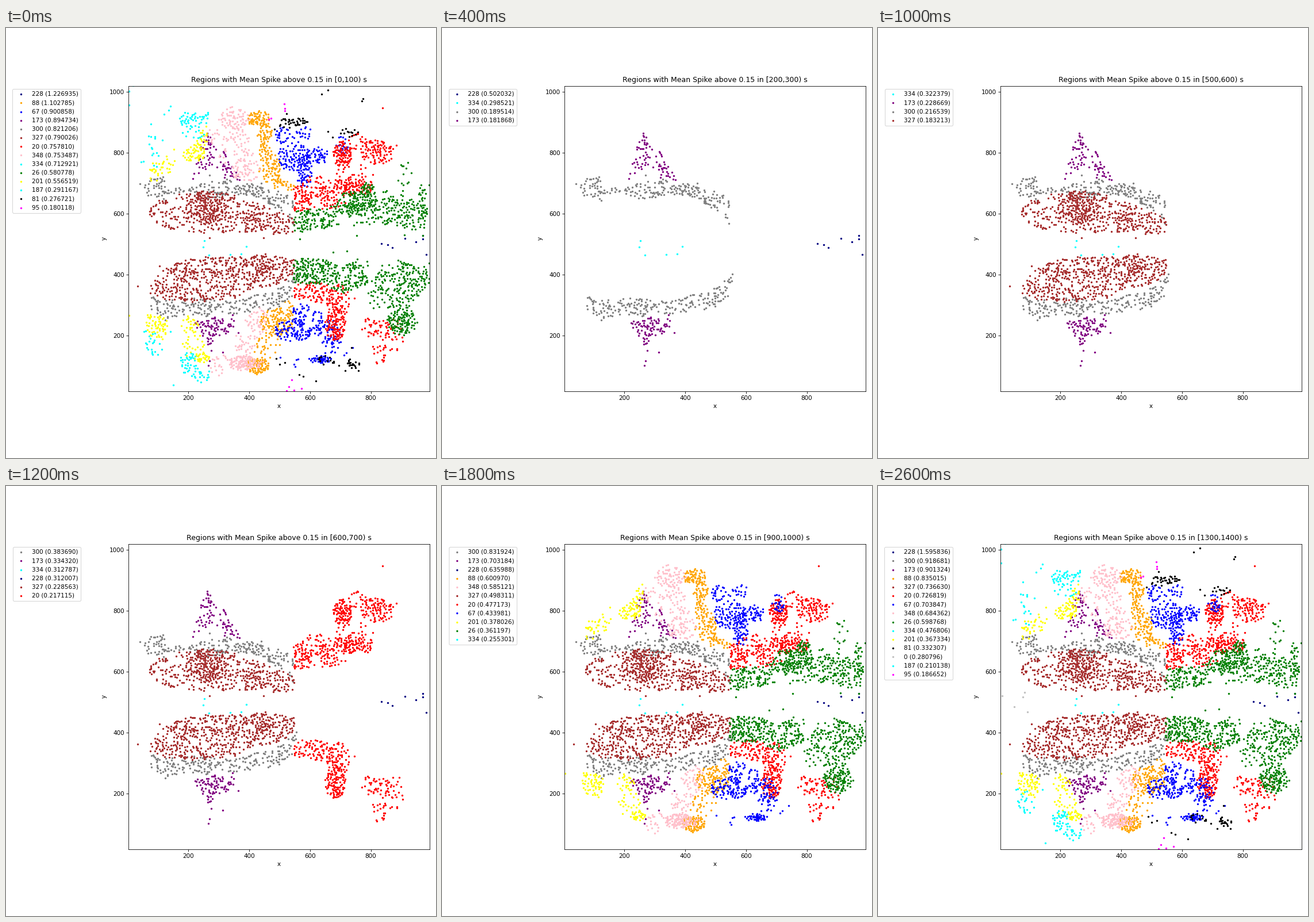
A matplotlib script that plays this animation: 748 px wide and 748 px high, repeating every 2.8 s.

```python
import numpy as np
import matplotlib.pyplot as plt
from matplotlib.animation import FuncAnimation

SIZE, DPI = 748, 74.8
THRESHOLD = 0.15
BASELINE = 0.153462
GAP = 3.6  # smallest distance between cells of one region

regions = {}


def band(n, *spans):
    """n cells between lower and upper outlines given as (x, low, high)."""
    x, low, high = np.array(spans, float).T

    def draw(rng):
        while True:
            px, py = rng.uniform(x[0], x[-1]), rng.uniform(low.min(), high.max())
            if np.interp(px, x, low) <= py <= np.interp(px, x, high):
                return px, py
    return n, draw


def blob(n, cx, cy, rx, ry):
    """n cells inside an ellipse, a little denser towards its centre."""
    def draw(rng):
        r, a = rng.uniform() ** 0.6, rng.uniform(0, 2 * np.pi)
        return cx + rx * r * np.cos(a), cy + ry * r * np.sin(a)
    return n, draw


def region(key, color, *parts, dots=()):
    rng = np.random.default_rng(key + 11)
    cells = np.empty((0, 2))
    for n, draw in parts:
        for _ in range(n):
            for _ in range(12):
                p = np.array(draw(rng))
                if not len(cells) or np.hypot(*(cells - p).T).min() > GAP:
                    break
            cells = np.vstack([cells, p])
    if dots:
        cells = np.vstack([cells, dots])
    regions[key] = color, cells


region(228, "navy", dots=[(835, 502), (855, 498), (871, 489), (912, 518),
                          (949, 507), (970, 517), (971, 527), (983, 466)])
region(334, "cyan", dots=[(253, 510), (250, 490), (268, 464),
                          (338, 466), (374, 468), (391, 492)])
region(95, "magenta", dots=[(516, 960), (517, 945), (517, 938), (472, 914),
                            (464, 909), (541, 53), (530, 30), (548, 20),
                            (573, 25), (524, 17)])
region(53, "gold", dots=[(338, 1010), (386, 957), (516, 996), (518, 990),
                         (519, 962), (548, 995), (536, 22)])
region(0, "silver", dots=[(10, 521), (48, 485), (78, 517), (83, 531), (92, 468)])

region(81, "black",
       blob(14, 518, 900, 20, 26), blob(20, 562, 903, 30, 14),
       blob(13, 728, 866, 30, 14), blob(12, 655, 120, 32, 17),
       blob(17, 741, 108, 24, 17),
       dots=[(639, 993), (660, 1006), (774, 978), (771, 970), (524, 928),
             (484, 878), (660, 870), (675, 850), (490, 123), (500, 105),
             (517, 111), (716, 83), (760, 83), (695, 100), (565, 70),
             (577, 65), (620, 50), (736, 160)])

region(187, "cyan",
       blob(34, 208, 910, 40, 28), blob(9, 258, 918, 14, 20),
       blob(14, 205, 868, 50, 25), blob(9, 90, 848, 30, 55),
       blob(6, 80, 785, 35, 35), blob(20, 88, 172, 36, 38),
       blob(36, 200, 108, 28, 38), blob(20, 240, 70, 34, 24),
       dots=[(5, 1002), (5, 957), (18, 1021), (136, 940), (141, 953),
             (120, 926), (45, 770), (52, 772), (150, 37), (60, 214),
             (141, 213), (55, 213)])

region(201, "yellow",
       band(34, (58, 735, 760), (80, 700, 765), (120, 720, 800), (155, 745, 815)),
       blob(44, 217, 800, 36, 34), blob(22, 245, 848, 17, 40),
       band(58, (60, 215, 268), (85, 190, 270), (115, 185, 262), (130, 212, 250)),
       blob(26, 200, 232, 32, 36), blob(22, 215, 165, 36, 45),
       blob(24, 244, 128, 24, 18), dots=[(6, 266), (258, 886)])

region(348, "pink",
       blob(68, 350, 915, 52, 38), blob(12, 275, 858, 26, 30),
       blob(26, 362, 855, 42, 30), blob(24, 385, 790, 28, 50),
       blob(50, 390, 742, 52, 40), blob(12, 320, 810, 34, 50),
       blob(96, 378, 110, 46, 25), blob(20, 305, 98, 38, 38),
       blob(30, 378, 168, 42, 42), blob(44, 425, 240, 38, 52),
       blob(8, 432, 110, 22, 18))

region(88, "orange",
       blob(62, 432, 912, 38, 26), blob(36, 450, 868, 26, 34),
       band(92, (432, 740, 850), (455, 705, 850), (480, 690, 800), (500, 705, 780)),
       band(26, (480, 675, 720), (515, 675, 710), (552, 675, 695)),
       blob(92, 482, 240, 46, 52), blob(36, 525, 262, 26, 52),
       blob(26, 455, 165, 46, 42), blob(76, 428, 102, 38, 29))

region(67, "blue",
       blob(24, 510, 856, 24, 30), blob(16, 572, 860, 34, 24),
       blob(92, 548, 788, 54, 52), blob(58, 580, 745, 26, 62),
       blob(34, 635, 792, 32, 30), blob(24, 705, 825, 20, 32),
       blob(94, 545, 217, 62, 38), blob(30, 572, 272, 32, 36),
       blob(34, 625, 240, 30, 42), blob(54, 668, 192, 38, 58),
       blob(40, 635, 121, 40, 12),
       dots=[(503, 127), (556, 120), (548, 105), (551, 97), (560, 122),
             (586, 885), (600, 877), (712, 134), (740, 160), (720, 142)])

region(20, "red",
       blob(84, 706, 795, 30, 44), blob(22, 760, 830, 36, 36),
       blob(84, 818, 803, 58, 40),
       band(56, (545, 608, 700), (570, 608, 690), (600, 615, 670)),
       blob(36, 612, 685, 42, 48), blob(52, 675, 668, 56, 50),
       blob(66, 735, 692, 52, 30), blob(22, 780, 695, 26, 34),
       blob(14, 745, 738, 70, 28), blob(22, 640, 640, 60, 25),
       band(80, (545, 310, 360), (570, 320, 375), (620, 310, 375), (675, 300, 362)),
       blob(62, 690, 310, 40, 60), blob(92, 682, 238, 34, 56),
       blob(22, 800, 232, 32, 38), blob(34, 862, 222, 48, 42),
       blob(24, 845, 155, 44, 46),
       dots=[(838, 948), (884, 825), (872, 813), (905, 180), (902, 193),
             (746, 322), (817, 112), (820, 109)])

region(26, "green",
       band(108, (545, 540, 610), (575, 540, 615), (630, 550, 615), (700, 560, 635)),
       blob(88, 735, 630, 48, 44), blob(66, 790, 660, 28, 52),
       band(150, (740, 560, 630), (800, 565, 640), (860, 565, 655),
            (920, 550, 650), (960, 545, 640)),
       blob(44, 970, 620, 17, 78), blob(12, 875, 655, 45, 28),
       blob(12, 910, 740, 28, 50),
       band(138, (545, 372, 445), (580, 370, 455), (640, 370, 450), (665, 365, 445)),
       band(116, (665, 355, 440), (710, 340, 430), (760, 355, 455), (795, 370, 440)),
       band(92, (790, 290, 355), (830, 290, 430), (900, 290, 430)),
       band(104, (890, 275, 450), (930, 290, 440), (960, 335, 420), (993, 365, 405)),
       blob(106, 902, 245, 50, 46), blob(16, 915, 415, 70, 32),
       dots=[(971, 527), (992, 695), (567, 517), (754, 527), (722, 476),
             (677, 473), (911, 530), (985, 397), (992, 438), (992, 387)])

region(300, "gray",
       band(40, (45, 668, 682), (75, 655, 715), (95, 655, 722), (125, 635, 726)),
       band(12, (130, 665, 690), (195, 670, 680)),
       band(62, (200, 665, 690), (240, 650, 702), (300, 648, 710), (345, 665, 715)),
       band(54, (350, 665, 690), (400, 660, 702), (445, 650, 700)),
       band(46, (445, 640, 690), (480, 620, 680), (520, 605, 676), (545, 566, 640)),
       band(176, (75, 282, 335), (110, 265, 325), (125, 252, 315), (200, 270, 325),
            (260, 262, 320), (320, 270, 315), (400, 275, 335), (500, 290, 340)),
       band(30, (495, 295, 365), (520, 315, 360), (540, 325, 400), (557, 380, 405)),
       dots=[(41, 697), (124, 250), (269, 727), (544, 567)])

region(173, "purple",
       band(72, (218, 710, 745), (245, 735, 830), (265, 755, 860), (290, 760, 832),
            (322, 715, 800), (345, 715, 752), (370, 700, 722)),
       band(78, (215, 238, 258), (240, 210, 258), (265, 165, 258), (290, 180, 262),
            (330, 208, 250), (360, 235, 262)),
       dots=[(263, 865), (264, 852), (271, 850), (216, 715), (270, 115),
             (266, 101), (275, 150), (314, 145), (364, 208), (346, 268)])

region(327, "brown",
       band(330, (68, 605, 612), (90, 575, 650), (130, 540, 645), (170, 545, 670),
            (230, 530, 675), (300, 535, 675), (340, 540, 665), (400, 540, 655),
            (460, 530, 620), (548, 535, 590)),
       blob(130, 265, 622, 68, 56), blob(36, 430, 575, 52, 30),
       band(500, (75, 335, 370), (110, 318, 410), (160, 310, 440), (220, 310, 458),
            (330, 312, 460), (400, 345, 462), (450, 352, 468), (500, 370, 458),
            (548, 400, 448)),
       blob(36, 430, 425, 70, 30), dots=[(33, 362), (270, 521), (447, 521), (106, 427)])


def means(text):
    """Parse 'region mean region mean ...'."""
    words = text.split()
    return {int(k): float(v) for k, v in zip(words[::2], words[1::2])}


def between(a, b, keys):
    """Halfway means of two windows for the given regions."""
    mid = {k: (a.get(k, BASELINE) + b.get(k, BASELINE)) / 2 for k in keys}
    return {k: v for k, v in mid.items() if v > THRESHOLD}


start = means("228 1.226935 88 1.102785 67 0.900858 173 0.894734 300 0.821206 "
              "327 0.790026 20 0.757810 348 0.753487 334 0.712921 26 0.580778 "
              "201 0.556519 187 0.291167 81 0.276721 95 0.180118")
quiet = means("228 0.502032 334 0.298521 300 0.189514 173 0.181868")
stir = means("334 0.322379 173 0.228669 300 0.216539 327 0.183213")
wake = means("300 0.550841 228 0.470552 173 0.439971 334 0.303196 20 0.280769 "
             "327 0.273912 26 0.225827 348 0.223284 67 0.220425 88 0.218354 "
             "201 0.216832")
rise = means("300 0.831924 173 0.703184 228 0.635988 88 0.600970 348 0.585121 "
             "327 0.498311 20 0.477173 67 0.433981 201 0.378026 26 0.361197 "
             "334 0.255301")
high = means("228 0.914003 173 0.847636 88 0.811991 300 0.730527 348 0.620397 "
             "327 0.584445 20 0.559558 67 0.543088 26 0.445001 334 0.431003 "
             "201 0.349066 95 0.293337 81 0.287470 187 0.188485 53 0.171241")
peak = means("228 1.595836 300 0.918681 173 0.901324 88 0.835015 327 0.736630 "
             "20 0.726819 67 0.703847 348 0.684362 26 0.598768 334 0.476806 "
             "201 0.367334 81 0.332307 0 0.280796 187 0.210138 95 0.186652")

core = list(wake)
outer = core + [187, 81, 95]
windows = [
    start, between(start, quiet, core),
    quiet, between(quiet, stir, [334, 300, 173]),
    between(quiet, stir, [334, 300, 173, 327, 20]), stir,
    between(stir, wake, [300, 228, 173, 334, 327, 20]), wake,
    between(wake, rise, core), rise,
    between(rise, high, outer), high,
    between(high, peak, outer), peak,
]

fig = plt.figure(figsize=(SIZE / DPI, SIZE / DPI), dpi=DPI)
ax = fig.add_axes([213.4 / SIZE, 116 / SIZE, 523.6 / SIZE, 531.5 / SIZE])


def update(i):
    ax.clear()
    ranked = sorted(windows[i].items(), key=lambda item: -item[1])
    for key, mean in ranked:
        color, cells = regions[key]
        ax.scatter(*cells.T, s=5, color=color, label=f"{key} ({mean:.6f})")
    ax.set(xlim=(4.2, 993.6), ylim=(15.8, 1020), xlabel="x", ylabel="y",
           xticks=range(200, 801, 200), yticks=range(200, 1001, 200))
    ax.set_title(f"Regions with Mean Spike above {THRESHOLD} "
                 f"in [{100 * i},{100 * (i + 1)}) s")
    ax.legend(loc="upper right", bbox_to_anchor=(-0.15, 1))
    return ax.get_children()


anim = FuncAnimation(fig, update, frames=len(windows), interval=200,
                     init_func=lambda: [], repeat=True, repeat_delay=0)
plt.show()
```
